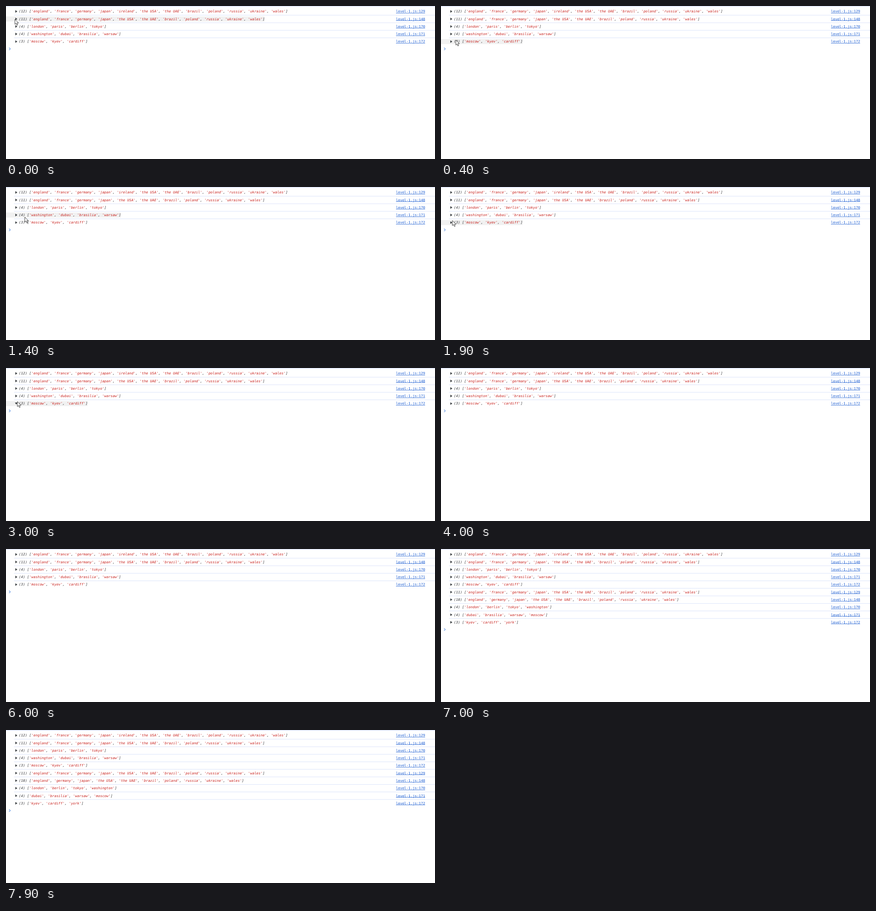
An HTML page that plays this animation: 868x310 px, repeating every 8000 ms.

```html
<!DOCTYPE html>
<html lang="en">
<head>
<meta charset="utf-8">
<title>Console arrays</title>
<style>
html, body { margin: 0; width: 100%; height: 100%; overflow: hidden; background: #fff; }
svg { display: block; width: 868px; height: 310px; }
text {
  font: 7px "DejaVu Sans Mono", "Liberation Mono", monospace;
  text-rendering: geometricPrecision;
  white-space: pre;
  fill: #303134;
}
.preview { font-style: italic; }
.str { fill: #c8201c; }
.key { fill: #8e004b; font-weight: 700; }
.dim { opacity: .6; }
.proto { fill: #757575; }
.link { fill: #1558d0; text-anchor: end; }
</style>
</head>
<body>
<svg id="stage" viewBox="0 0 868 310"></svg>
<script>
const LOOP = 8000, STEP = 100;
const PITCH = 15.27, FIRST = 11, CHAR = 4.214, CHILD = 10.2;
const stage = document.getElementById("stage");

const words = s => s.split(",");
const lists = [
  ["england,france,germany,japan,ireland,the USA,the UAE,brazil,poland,russia,ukraine,wales", 129],
  ["england,france,germany,japan,the USA,the UAE,brazil,poland,russia,ukraine,wales", 148],
  ["london,paris,berlin,tokyo", 170],
  ["washington,dubai,brasilia,warsaw", 171],
  ["moscow,kyev,cardiff", 172],
  ["england,france,germany,japan,the USA,the UAE,brazil,poland,russia,ukraine,wales", 129],
  ["england,germany,japan,the USA,the UAE,brazil,poland,russia,ukraine,wales", 148],
  ["london,berlin,tokyo,washington", 170],
  ["dubai,brasilia,warsaw,moscow", 171],
  ["kyev,cardiff,york", 172]
];

// Pointer tip: time, x, y
const path = [
  [0, 18, 27], [100, 19, 34], [200, 22, 49], [300, 27, 63], [400, 30, 69],
  [500, 30, 69], [900, 23, 69], [1400, 38, 61], [1900, 23, 68],
  [3000, 23, 68], [3400, 27, 68], [3800, 34, 61], [3900, 36, 44]
];

function add(parent, tag, attrs, content) {
  const el = document.createElementNS("http://www.w3.org/2000/svg", tag);
  for (const k in attrs) el.setAttribute(k, attrs[k]);
  if (content !== undefined) el.textContent = content;
  parent.appendChild(el);
  return el;
}

function write(parent, x, y, parts, cls = "") {
  const el = add(parent, "text", { x, y: y + 2.4, class: cls });
  for (const [s, c] of parts) add(el, "tspan", { class: c || "" }, s);
  return el;
}

const show = (el, on) => el.setAttribute("visibility", on ? "visible" : "hidden");
const centre = i => FIRST + i * PITCH;
const arrow = (parent, x, y) =>
  add(parent, "path", { d: `M${x} ${y - 2.7}l4 2.7l-4 2.7z`, fill: "#3c4043" });

add(stage, "rect", { width: 868, height: 1.1, fill: "#d5dff9" });
const hover = add(stage, "rect", { x: 0, height: 10.2, fill: "#f1f1f1" });

const rows = lists.map(([csv, line], i) => {
  const g = add(stage, "g", {});
  const y = centre(i);
  const names = words(csv);
  const parts = [[`(${names.length}) [`]];
  names.forEach((n, k) => {
    if (k) parts.push([", "]);
    parts.push([`'${n}'`, "str"]);
  });
  parts.push(["]"]);
  if (i) add(g, "rect", { x: 16, y: y - 8, width: 852, height: .8, fill: "#d5dff9" });
  const mark = arrow(g, 18.9, y);
  write(g, 26, y, parts, "preview");
  write(g, 848, y, [[`level-1.js:${line}`]], "link");
  add(g, "rect", { x: 789, y: y + 3.1, width: 59, height: .7, fill: "#1558d0" });
  const length = parts.reduce((n, p) => n + p[0].length, 0);
  return { g, mark, end: 26 + length * CHAR };
});

// Expanded view of the fifth array
const top5 = centre(4);
const details = add(stage, "g", {});
words(lists[4][0]).forEach((n, k) =>
  write(details, 34, top5 + CHILD * (k + 1), [[String(k), "key"], [": "], [`"${n}"`, "str"]]));
write(details, 34, top5 + CHILD * 4, [["length", "key dim"], [": 3"]]);
write(details, 34, top5 + CHILD * 5, [["[[Prototype]]", "proto"], [": Array(0)"]]);
arrow(details, 28, top5 + CHILD * 5);
add(details, "circle", { cx: 171.5, cy: top5, r: 3, fill: "none", stroke: "#6e6e6e", "stroke-width": .7 });
add(details, "path", { d: `M171.5 ${top5 - 1.7}v.8m0 .7v2`, stroke: "#6e6e6e", "stroke-width": .7 });

const openMark = add(stage, "path", { d: `M18 ${top5 - 2}h5.4l-2.7 4z`, fill: "#3c4043" });
const prompt = add(stage, "path", {
  d: "M6.2 -2.4L8.9 0L6.2 2.4", fill: "none", stroke: "#1a66d6", "stroke-width": 1
});
const pointer = add(stage, "path", {
  d: "M0 0V10.2L2.3 8L4 12L5.8 11.2L4.1 7.4H7.4Z",
  fill: "#fff", stroke: "#222", "stroke-width": .8, "stroke-linejoin": "round"
});

function tipAt(t) {
  if (t >= 7800 && t < 7900) return [762, 259];
  if (t >= 4000) return null;
  const i = path.findIndex(p => p[0] > t);
  if (i < 0) return path[path.length - 1].slice(1);
  const [t0, x0, y0] = path[i - 1], [t1, x1, y1] = path[i];
  const f = (t - t0) / (t1 - t0);
  return [x0 + (x1 - x0) * f, y0 + (y1 - y0) * f];
}

function render(time) {
  const t = Math.floor(time % LOOP / STEP) * STEP;
  const count = t < 7000 ? 5 : 10;
  const open = t >= 2400 && t < 3000;
  const turned = t >= 2300 && t < 3100;

  rows.forEach((r, i) => show(r.g, i < count));
  rows[4].mark.setAttribute("opacity", turned ? 0 : 1);
  show(openMark, turned);
  show(details, open);
  const py = centre(count) - .5 + (open ? CHILD * 5 : 0);
  prompt.setAttribute("transform", `translate(0 ${py})`);

  const tip = tipAt(t);
  show(pointer, tip);
  const over = tip ? Math.floor((tip[1] - FIRST) / PITCH + .5) : -1;
  const hit = over >= 0 && over < count;
  show(hover, hit);
  if (hit) {
    hover.setAttribute("y", centre(over) - 5.1);
    hover.setAttribute("width", rows[over].end);
  }
  if (tip) pointer.setAttribute("transform", `translate(${tip[0]} ${tip[1]})`);
}

function tick() {
  render(performance.now());
  requestAnimationFrame(tick);
}
tick();
</script>
</body>
</html>
```
